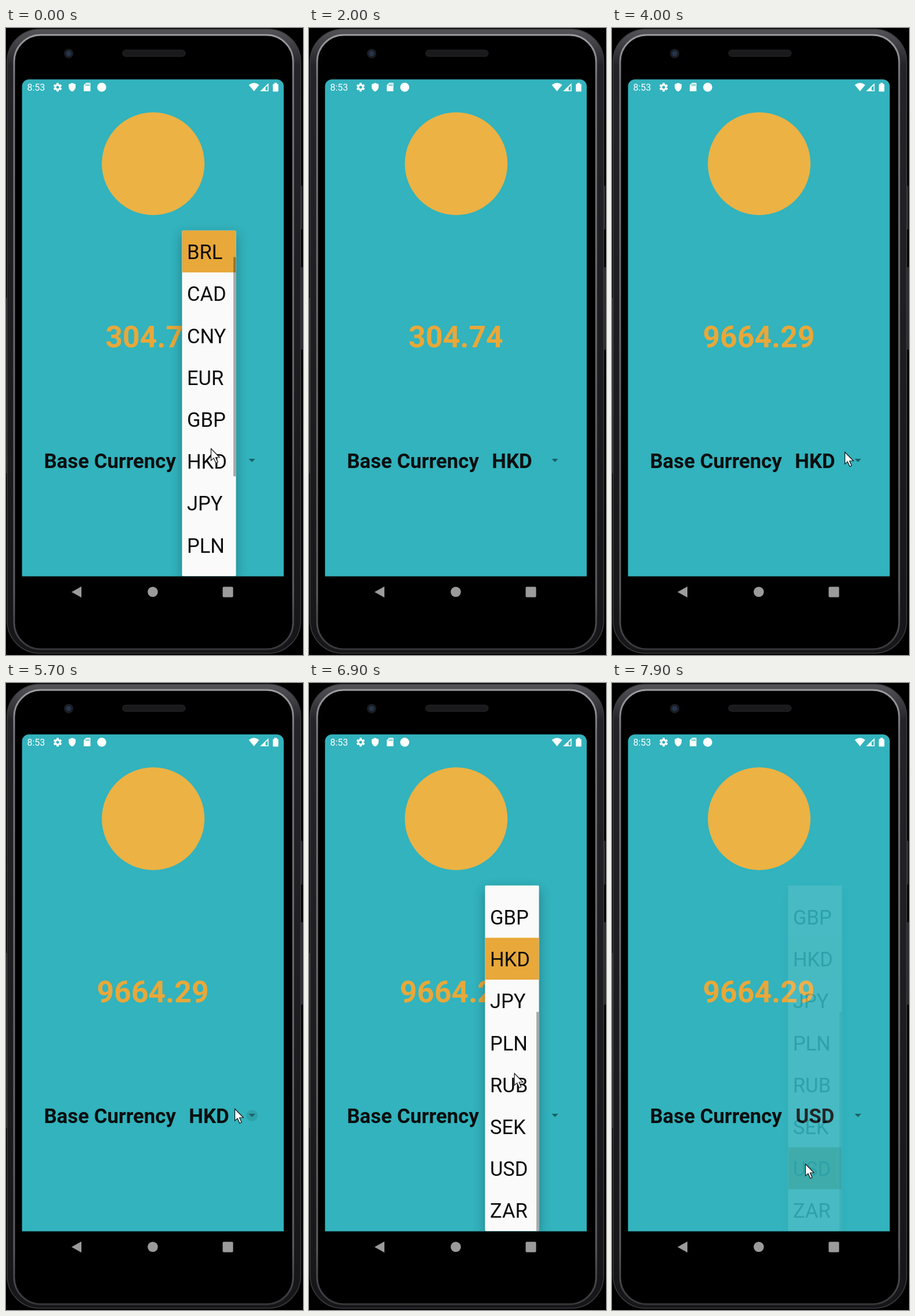
Recreate the animation shown at these times as an HTML page with a canvas. Size 512 by 1080 pixels, loop 8 s.

```html
<!DOCTYPE html>
<html lang="en">
<head>
<meta charset="utf-8">
<title>Exchange rate</title>
<style>
  html, body { margin: 0; width: 100%; height: 100%; overflow: hidden; background: #000; }
  canvas { display: block; width: 512px; height: 1080px; }
</style>
</head>
<body>
<canvas id="stage" width="512" height="1080"></canvas>
<script>
const LOOP = 8000, STEP = 100;
const TEAL = '#32b3bd', GOLD = '#e8a83a', COIN = '#ecb244', INK = '#0a0e0f', KEY = '#9b9b9b';
const FONT = 'Roboto, Arial, sans-serif';
const CODES = 'AUD BRL CAD CNY EUR GBP HKD JPY PLN RUB SEK USD ZAR'.split(' ');
const ROW = 72.2;
const SCREEN = { x: 27.6, y: 88.6, w: 451.2, h: 855.8 };
const LIST = { x: 303.5, y: 348.8, w: 93, h: 595.4 };
const MAX_SCROLL = CODES.length * ROW - LIST.h;

// Moments of the story, in ms
const CLOSE_1 = 475, LEAVE = 1300, UPDATE = 3000, ENTER = 3700;
const TAP = 5700, OPEN = 6000, BROWSE = 6500, CLOSE_2 = 7600;

const stage = document.getElementById('stage').getContext('2d');
const layer = newLayer(), phone = newLayer();

function newLayer() {
  const c = document.createElement('canvas');
  c.width = 512;
  c.height = 1080;
  return c.getContext('2d');
}

const progress = (t, from, length) => Math.max(0, Math.min(1, (t - from) / length));
const smooth = u => u * u * u * (u * (6 * u - 15) + 10);
const easeOut = u => 1 - (1 - u) ** 3;
const mix = (a, b, u) => a + (b - a) * u;
const bow = u => Math.sin(Math.PI * u);

function rounded(c, x, y, w, h, r, color) {
  c.beginPath();
  c.roundRect(x, y, w, h, r);
  if (color) { c.fillStyle = color; c.fill(); }
}

function outline(c, width, color) {
  c.lineWidth = width;
  c.strokeStyle = color;
  c.stroke();
}

function disc(c, x, y, r, color) {
  c.beginPath();
  c.arc(x, y, r, 0, 7);
  c.fillStyle = color;
  c.fill();
}

function poly(c, points, color) {
  c.beginPath();
  points.forEach(([x, y]) => c.lineTo(x, y));
  c.closePath();
  c.fillStyle = color;
  c.fill();
}

function text(c, s, x, y, font, color, align = 'left') {
  c.font = `${font} ${FONT}`;
  c.textAlign = align;
  c.fillStyle = color;
  c.fillText(s, x, y);
}

function drawGear(c, x, y) {
  c.save();
  c.translate(x, y);
  for (let i = 0; i < 6; i++) {
    c.rotate(Math.PI / 3);
    rounded(c, -2, -7.4, 4, 6, 1, '#fff');
  }
  disc(c, 0, 0, 5.4, '#fff');
  disc(c, 0, 0, 2.5, TEAL);
  c.restore();
}

function drawShield(c, x, y) {
  c.beginPath();
  c.moveTo(x, y - 7.5);
  c.lineTo(x + 6, y - 5);
  c.quadraticCurveTo(x + 7, y + 5, x, y + 7.5);
  c.quadraticCurveTo(x - 7, y + 5, x - 6, y - 5);
  c.fillStyle = '#fff';
  c.fill();
}

function drawStatusBar(c) {
  text(c, '8:53', 36.5, 108, '16px', '#fff');
  drawGear(c, 89, 102);
  drawShield(c, 114, 102);

  // memory card
  poly(c, [[138, 94.5], [145.5, 94.5], [145.5, 109], [134, 109], [134, 98.5]], '#fff');
  c.fillStyle = TEAL;
  for (let i = 0; i < 3; i++) c.fillRect(137.5 + 2.5 * i, 96.5, 1.3, 3.5);

  disc(c, 165, 102, 7.8, '#fff');

  // wifi
  c.beginPath();
  c.moveTo(427.5, 109);
  c.lineTo(418.5, 98);
  c.quadraticCurveTo(427.5, 91, 436.5, 98);
  c.fillStyle = '#fff';
  c.fill();

  // signal
  poly(c, [[452.5, 95], [452.5, 109], [438, 109]], '#fff');
  poly(c, [[451, 99], [451, 107.5], [447.5, 107.5], [447.5, 102.5]], TEAL);

  // battery
  rounded(c, 460, 96.5, 9.5, 13, 1.2, '#fff');
  c.fillRect(462.5, 94.5, 4.5, 3);
}

function drawBody(c) {
  c.fillStyle = '#000';
  c.fillRect(0, 0, 512, 1080);

  // side keys
  c.fillStyle = '#2c2c30';
  c.fillRect(507, 272, 4, 75);
  c.fillRect(507, 412, 5, 142);
  c.fillRect(0, 465, 2, 302);

  // shell, then the metal rim, brightest at the top
  const shell = c.createLinearGradient(0, 0, 0, 1080);
  shell.addColorStop(0, '#55555a');
  shell.addColorStop(.06, '#242428');
  shell.addColorStop(1, '#161618');
  rounded(c, 2, 2, 506, 1075, 56, shell);
  outline(c, 1.5, '#3b3b40');
  const shine = c.createLinearGradient(0, 0, 0, 1080);
  shine.addColorStop(0, '#a2a2a7');
  shine.addColorStop(.08, '#77777d');
  shine.addColorStop(.9, '#5c5c62');
  shine.addColorStop(1, '#333337');
  rounded(c, 14, 12, 481, 1058, 46, '#000');
  outline(c, 3, shine);
}

function drawPhone(c) {
  drawBody(c);

  // camera and speaker
  disc(c, 108, 44, 8, '#1b1d22');
  disc(c, 108, 44, 4.5, '#24344c');
  rounded(c, 201, 38, 108, 11, 5.5, '#1a1a1c');
  outline(c, 1, '#29292c');

  // navigation keys
  poly(c, [[113, 971.5], [130, 962], [130, 981]], KEY);
  disc(c, 253, 971.3, 8.8, KEY);
  rounded(c, 373.5, 962.5, 18, 18, 2, KEY);

  // app screen
  rounded(c, SCREEN.x, SCREEN.y, SCREEN.w, SCREEN.h, [12, 12, 0, 0], TEAL);
  drawStatusBar(c);
  disc(c, 253.7, 233.7, 88.5, COIN);
  text(c, 'Base Currency', 65.4, 758, 'bold 34.8px', INK);
}

// Open list; reveal runs from the spinner (0) to full size (1)
function drawList(c, { alpha, scroll, selected, pressed, press, reveal }) {
  const { x, y, w, h } = LIST, rest = 1 - reveal, inset = rest * 262;
  c.clearRect(0, 0, 512, 1080);
  c.save();
  c.beginPath();
  c.rect(SCREEN.x, SCREEN.y, SCREEN.w, SCREEN.h);
  c.clip();
  c.translate(rest * 26, rest * 99);

  c.save();
  c.shadowColor = 'rgba(0,0,0,.3)';
  c.shadowBlur = 20;
  c.shadowOffsetY = 7;
  rounded(c, x, y + inset, w, h - 2 * inset, 2, '#fafafa');
  c.restore();

  rounded(c, x, y + inset, w, h - 2 * inset, 2);
  c.clip();
  CODES.forEach((code, i) => {
    const top = y + i * ROW - scroll;
    const fill = (color, a) => {
      c.globalAlpha = a;
      c.fillStyle = color;
      c.fillRect(x, top, w, ROW);
      c.globalAlpha = 1;
    };
    // the old choice pales and the new one darkens as the list fades
    if (i === selected) fill(GOLD, alpha);
    if (i === pressed) {
      fill('#e59d22', press);
      fill('#000', .25 * (1 - alpha));
    }
    text(c, code, 312, top + 49.3, '34.5px', '#0c0c0c');
  });

  const ratio = h / (CODES.length * ROW);
  c.fillStyle = 'rgba(0,0,0,.33)';
  c.fillRect(x + w - 4.5, y + scroll * ratio, 4.5, h * ratio);
  c.restore();
}

function listState(t) {
  const fade = from => 1 - smooth(progress(t, from, 400));
  if (t < LEAVE) {
    return { alpha: fade(CLOSE_1), scroll: ROW, selected: 1, pressed: 6,
      press: progress(t, 0, 400), reveal: 1 };
  }
  return { alpha: progress(t, OPEN - 100, 200) * fade(CLOSE_2), scroll: MAX_SCROLL,
    selected: 6, pressed: 11, press: progress(t, CLOSE_2 - 200, 300),
    reveal: easeOut(progress(t, OPEN, 520)) };
}

function pointerAt(t) {
  if (t < LEAVE + 300) {
    const u = progress(t, LEAVE, 200);
    return [mix(353, 4, u), mix(724, 803, u) - 67 * bow(u)];
  }
  if (t < ENTER) return null;
  const enter = easeOut(progress(t, ENTER, 300));
  const drift = progress(t, 4700, 900);
  const browse = smooth(progress(t, BROWSE, 1000));
  return [
    mix(469, 401, enter) - 7 * drift + 12 * bow(drift) - 61 * browse - 25 * bow(browse),
    mix(732, 730, enter) + 3 * drift + 95 * browse - 100 * bow(2 * browse)
  ];
}

function drawPointer(c, [x, y]) {
  c.save();
  c.translate(x + .5, y + .5);
  poly(c, [[0, 0], [0, 20.5], [4.6, 16.4], [8.3, 24.8], [11.6, 23.3], [8, 15.2], [14.6, 15]], '#fff');
  outline(c, 1.2, '#111');
  c.restore();
}

function draw(t) {
  const c = stage;
  c.drawImage(phone.canvas, 0, 0);
  const price = t < UPDATE ? '304.74' : '9664.29';
  const base = t < CLOSE_1 ? 'BRL' : t < CLOSE_2 + 100 ? 'HKD' : 'USD';
  text(c, price, 253.1, 549.6, 'bold 51.7px', GOLD, 'center');
  text(c, base, 350, 758, 'bold 34.8px', INK, 'center');

  // spinner arrow and its touch ripple
  if (t >= TAP) {
    const u = progress(t, TAP - 100, 500);
    disc(c, 424, 745, 22 * Math.sqrt(u), `rgba(0,0,0,${.12 * (1 - u)})`);
  }
  poly(c, [[418.3, 742], [429.7, 742], [424, 747.8]], '#1b6268');

  const list = listState(t);
  if (list.alpha > 0) {
    drawList(layer, list);
    c.globalAlpha = list.alpha;
    c.drawImage(layer.canvas, 0, 0);
    c.globalAlpha = 1;
  }
  const pointer = pointerAt(t);
  if (pointer) drawPointer(c, pointer);
}

function tick(now) {
  const t = Math.max(0, now - start) % LOOP;
  draw(Math.floor(t / STEP) * STEP);
  requestAnimationFrame(tick);
}

drawPhone(phone);
const start = performance.now();
draw(0);
requestAnimationFrame(tick);
</script>
</body>
</html>
```
